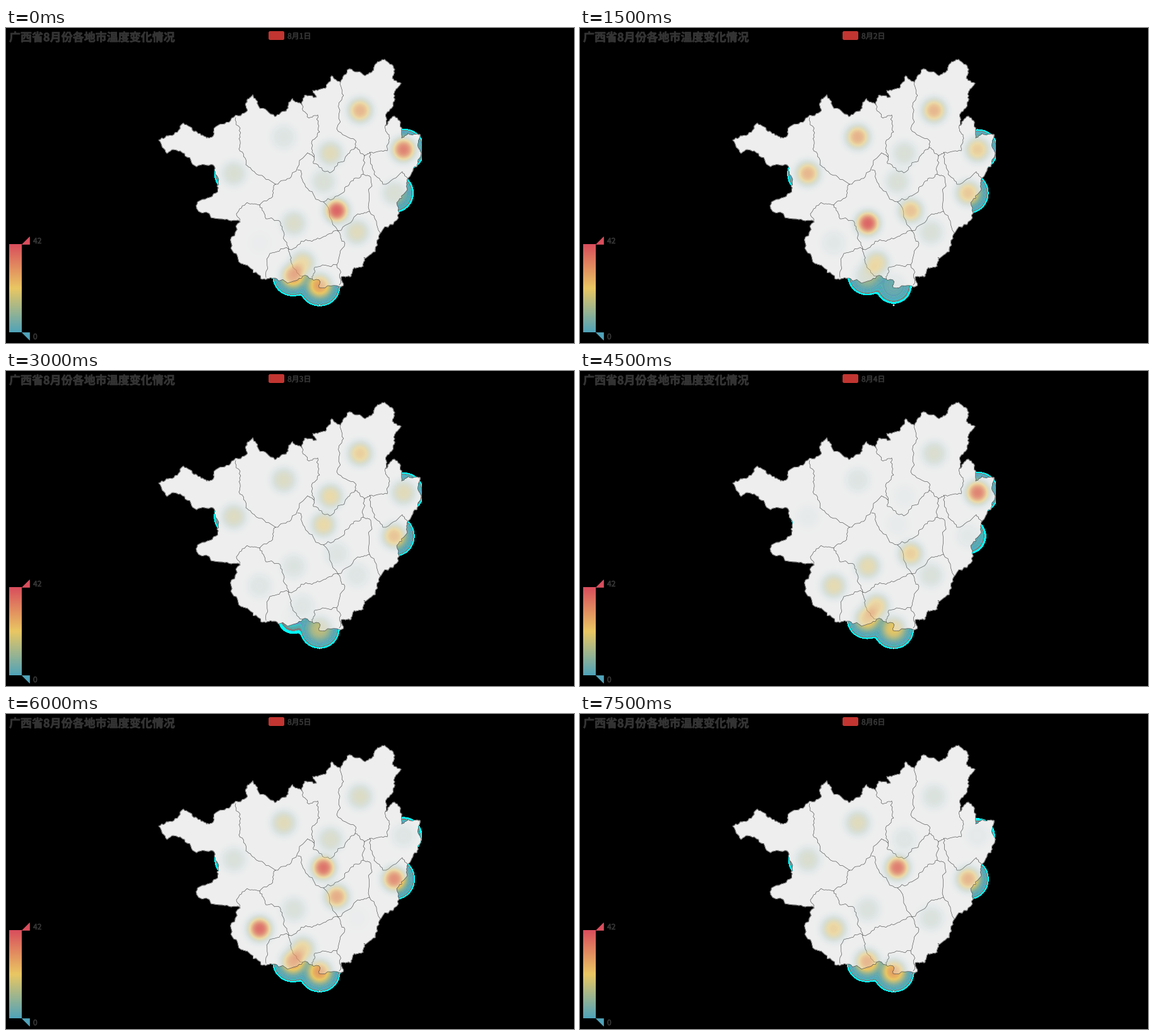
These frames come from a looping animation (900x500 px, 8 s). A matplotlib script:

```python
import numpy as np
import matplotlib.pyplot as plt
from matplotlib.animation import FuncAnimation
from matplotlib.patches import Circle, FancyBboxPatch, Polygon
from matplotlib.path import Path
from matplotlib.patheffects import withStroke

W, H, DPI = 900, 500, 100
PX = 72 / DPI
LAND, EDGE, INK = "#eeeeee", "#444444", "#333333"
COLD, WARM, HOT = (80, 163, 186), (234, 199, 99), (217, 78, 93)
plt.rcParams["font.family"] = ["Noto Sans CJK JP", "DejaVu Sans"]
rng = np.random.default_rng(8)

# Corners of the province, clockwise from the western tip
CORNERS = [
    (242, 178), (263, 171), (281, 151), (301, 164), (318, 175), (328, 172),
    (330, 159), (356, 147), (381, 133), (382, 115), (391, 106), (400, 124),
    (426, 141), (444, 132), (454, 112), (469, 122), (473, 107), (492, 110),
    (486, 99), (506, 96), (516, 76), (530, 86), (544, 65), (569, 76),
    (583, 67), (586, 57), (600, 50), (616, 66), (612, 80), (626, 88),
    (616, 100), (613, 121), (603, 135), (601, 155), (615, 140), (625, 150),
    (627, 175), (637, 167), (656, 169), (653, 189), (658, 199), (651, 220),
    (636, 240), (635, 253), (622, 274), (619, 305), (592, 327), (585, 355),
    (567, 364), (566, 378), (552, 380), (545, 395), (531, 395), (534, 409),
    (496, 412), (498, 403), (470, 394), (446, 405), (424, 397), (404, 398),
    (382, 376), (369, 371), (357, 341), (371, 308), (343, 303), (302, 286),
    (304, 276), (333, 262), (337, 240), (328, 217), (302, 220), (283, 199),
    (263, 193), (255, 199),
]

# Junctions of the city borders, and the bends between them
A, B, C, D = (427, 248), (402, 281), (488, 205), (553, 190)
E, F, G, J = (568, 203), (566, 232), (503, 276), (526, 322)
K, L, M = (448, 351), (576, 291), (524, 376)
BORDERS = [
    [(364, 142), (370, 170), (369, 192), (380, 217), (397, 232), A],
    [A, (420, 270), B],
    [(371, 308), (365, 295), (382, 277), B],
    [B, (412, 303), (434, 307), (440, 331), K],
    [A, (452, 236), (478, 198), C],
    [(469, 122), (480, 143), (494, 138), (497, 165), (484, 183), C],
    [C, (487, 215), (513, 230), (537, 207), D],
    [(530, 86), (532, 114), (524, 160), (554, 179), D, E],
    [(601, 155), (608, 175), (604, 195), (579, 197), E],
    [E, F, (547, 243), (533, 262), G],
    [(576, 197), (582, 225), (597, 248), (628, 228), (636, 240)],
    [F, (578, 237), L, (593, 325)],
    [L, (555, 297), J],
    [(462, 225), (478, 255), G, J],
    [J, (500, 333), (475, 336), K],
    [J, (537, 342), M, (528, 408)],
    [M, (489, 380), (484, 400)],
    [(412, 396), (418, 358), K],
    [K, (452, 373), (470, 394)],
]

# Every city: x, y and its heat in percent on the six days
CITIES = [
    (561, 131, 68, 68, 57, 30, 36, 20),
    (630, 193, 86, 58, 42, 86, 13, 6),
    (615, 262, 27, 60, 62, 9, 82, 68),
    (440, 173, 15, 70, 36, 15, 42, 40),
    (361, 231, 28, 68, 38, 5, 22, 30),
    (514, 199, 42, 25, 50, 4, 32, 13),
    (503, 244, 25, 25, 50, 4, 91, 88),
    (524, 290, 95, 63, 15, 57, 72, 0),
    (456, 310, 33, 95, 17, 46, 22, 20),
    (556, 324, 40, 24, 13, 22, 2, 20),
    (402, 341, 2, 10, 13, 46, 92, 55),
    (470, 373, 50, 50, 12, 55, 55, 0),
    (455, 393, 72, 28, 2, 58, 70, 68),
    (497, 409, 66, 9, 36, 50, 68, 66),
]


def rough(points, amounts=(0.08, 0.18, 0.32)):
    """Break a polyline into a jagged one by shifting midpoints."""
    pts = np.array(points, float)
    for amount in amounts:
        step = np.diff(pts, axis=0)
        normal = np.column_stack([-step[:, 1], step[:, 0]])
        shift = rng.uniform(-amount, amount, (len(step), 1))
        out = np.empty((2 * len(pts) - 1, 2))
        out[::2] = pts
        out[1::2] = pts[:-1] + step / 2 + normal * shift
        pts = out
    return pts


def ramp(t):
    """Colour for a heat level between 0 and 1."""
    stops = np.array([COLD, WARM, HOT], float)
    return np.stack([np.interp(t, [0, 0.5, 1], stops[:, k]) for k in range(3)], -1)


def make_brush(radius=17.5, sigma=6, reach=40):
    """Soft disc: a filled circle under a Gaussian blur."""
    d = np.arange(-reach, reach) + 0.5
    disc = np.clip(radius + 0.5 - np.hypot(d[:, None], d), 0, 1)
    k = np.arange(-3 * sigma, 3 * sigma + 1)
    kernel = np.exp(-k**2 / (2 * sigma**2))
    kernel /= kernel.sum()
    for axis in (0, 1):
        disc = np.apply_along_axis(np.convolve, axis, disc, kernel, "same")
    return disc


outline = rough(CORNERS + CORNERS[:1])
gx, gy = np.meshgrid(np.arange(W) + 0.5, np.arange(H) + 0.5)
inside = Path(outline).contains_points(
    np.column_stack([gx.ravel(), gy.ravel()])).reshape(H, W)
brush = make_brush()
R = len(brush) // 2


def heat_image(day):
    field = np.zeros((H, W))
    for x, y, *levels in CITIES:
        part = field[y - R:y + R, x - R:x + R]
        part += brush * levels[day] / 100 * (1 - part)
    field[:, 659:] = 0
    field[443:] = 0
    alpha = np.round(field * 255)
    # Premultiplied 8-bit rounding gives the cyan rim and the faint rings
    safe = np.maximum(alpha, 1)[..., None]
    rgb = np.round(ramp(alpha / 256) * safe / 255) * 255 / safe
    opacity = np.where(inside, alpha, 255 * (alpha > 0))
    return np.dstack([np.clip(rgb, 0, 255), opacity]).astype(np.uint8)


fig = plt.figure(figsize=(W / DPI, H / DPI), dpi=DPI, facecolor="black")
ax = fig.add_axes([0, 0, 1, 1])
ax.axis("off")


def label(x, y, text, size=12, **kw):
    return ax.text(x, y, text, fontsize=size * PX, color=INK,
                   va="center_baseline", **kw,
                   path_effects=[withStroke(linewidth=0.8 * PX, foreground=INK)])


ax.add_patch(Polygon(outline, fc=LAND, ec=LAND, lw=1.2 * PX, zorder=1))
for line in BORDERS:
    ax.plot(*rough(line).T, color=EDGE, lw=0.6 * PX, zorder=2)
heat = ax.imshow(heat_image(0), extent=(0, W, H, 0),
                 interpolation="nearest", zorder=3)
ax.add_patch(Polygon(outline, fc="none", ec=EDGE, lw=0.6 * PX, zorder=4))
ax.add_patch(Circle((497, 440), 1.4, fc=LAND, ec=EDGE, lw=0.5 * PX, zorder=4))

label(5, 14, "广西省8月份各地市温度变化情况", 18, weight="bold")
ax.add_patch(FancyBboxPatch((419, 8), 19, 8, fc="#c23531", ec="none",
                            boxstyle="round,pad=3,rounding_size=2.5"))
date = label(446, 12, "8月1日")

bar = ramp(np.linspace(1, 0, 140))[:, None].astype(np.uint8)
ax.imshow(bar, extent=(5, 25, 483, 343), interpolation="nearest")
for y, tip, color in ((343, 331, HOT), (483, 495, COLD)):
    color = np.array(color) / 255
    ax.add_patch(Polygon([(25, y), (37, y), (37, tip)], color=color, lw=0.7 * PX))
label(43, 337, "42")
label(43, 489, "0")

ax.set_xlim(0, W)
ax.set_ylim(H, 0)
ax.set_aspect("auto")


def update(i):
    day = i // 3
    heat.set_data(heat_image(day))
    date.set_text(f"8月{day + 1}日")
    return heat, date


anim = FuncAnimation(fig, update, frames=16, interval=500, repeat=True)
plt.show()
```
